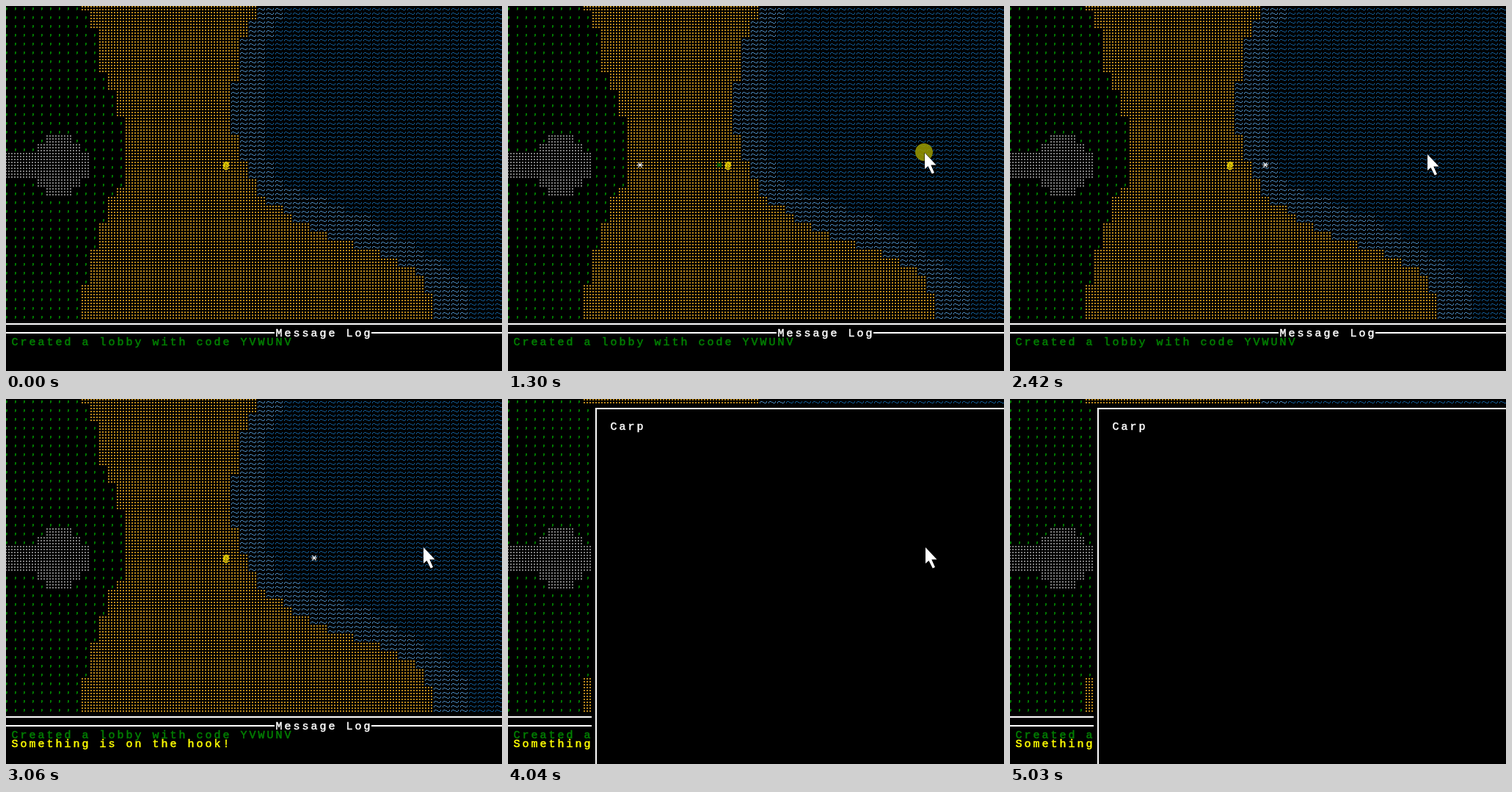
Animation of 676 by 497 pixels, one loop 6070 ms. Source, as an HTML page with a canvas:

```html
<!DOCTYPE html>
<html lang="en">
<head>
<meta charset="utf-8">
<title>Fishing</title>
<style>
html, body { margin: 0; width: 100%; height: 100%; overflow: hidden; background: #000; }
canvas, svg { position: absolute; left: 0; top: 0; display: block; }
text {
  font: 15px "Liberation Mono", "DejaVu Sans Mono", monospace;
  letter-spacing: 3px;
  white-space: pre;
  fill: #fff;
  stroke: #fff;
  stroke-width: .5px;
}
.green { fill: #008000; stroke: #008000; }
.yellow { fill: #ff0; stroke: #ff0; }
.star { fill: none; stroke: #fff; stroke-width: 1.1; }
#hero { font-size: 13px; letter-spacing: 0; text-anchor: middle; fill: #ffe800; stroke: #ffe800; }

.anim { animation: 6070ms step-end infinite; }
#mark { animation-name: mark; }
#meter { animation-name: meter; stroke: #008000; }
#bobber { animation-name: bobber; }
#bite { animation-name: bite; }
#panel { animation-name: panel; }
#click { animation-name: click; }
#cursor { animation-name: cursor; }
#passing { animation-name: passing; }

@keyframes mark {
  0%, 35.25%, 66.55%, 100% { opacity: 0; }
  20.26%, 65.4% { opacity: 1; }
}
@keyframes meter {
  0%, 35.25%, 100% { transform: translate(-99px, 216.5px); }
  21.41% { transform: translate(288px, 216.5px); }
  24.87% { transform: translate(276px, 216.5px); }
  27.18% { transform: translate(264px, 216.5px); }
  30.64% { transform: translate(252px, 216.5px); }
  32.94% { transform: translate(240px, 216.5px); }
}
@keyframes bobber {
  0%, 66.55%, 100% { transform: translate(-99px, 216.5px); }
  36.4% { transform: translate(312px, 216.5px); }
  37.56% { transform: translate(324px, 216.5px); }
  38.71% { transform: translate(336px, 216.5px); }
  39.86% { transform: translate(348px, 216.5px); }
  41.02% { transform: translate(360px, 216.5px); }
  42.17% { transform: translate(372px, 216.5px); }
  43.32% { transform: translate(384px, 216.5px); }
  44.48% { transform: translate(396px, 216.5px); }
  45.63% { transform: translate(420px, 216.5px); }
}
@keyframes bite {
  0%, 100% { opacity: 0; }
  50.41% { opacity: 1; }
}
@keyframes panel {
  0%, 100% { opacity: 0; }
  66.55% { opacity: 1; }
}
@keyframes click {
  0%, 35.25%, 65.4%, 100% { transform: translate(-99px, -99px); }
  19.11% { transform: translate(567px, 188px); }
  20.26% { transform: translate(567px, 194px); }
  21.41% { transform: translate(567px, 199px); }
  22.56%, 64.25% { transform: translate(568px, 200px); }
}
@keyframes cursor {
  0%, 82.86%, 100% { transform: translate(-99px, -99px); }
  10.87% { transform: translate(653px, 286px); }
  12.02% { transform: translate(604px, 249px); }
  13.17% { transform: translate(569px, 219px); }
  14.49% { transform: translate(545px, 181px); }
  15.65% { transform: translate(569px, 202px); }
  19.11% { transform: translate(568px, 190px); }
  20.26% { transform: translate(568px, 196px); }
  21.41% { transform: translate(568px, 200px); }
  22.56% { transform: translate(569px, 202px); }
  79.4% { transform: translate(581px, 240px); }
  80.56% { transform: translate(607px, 325px); }
  81.71% { transform: translate(642px, 444px); }
}
@keyframes passing {
  0%, 7.57%, 100% { opacity: 0; }
  6.42% { opacity: 1; }
}
</style>
</head>
<body>
<canvas id="map" width="676" height="497"></canvas>
<svg width="676" height="497" viewBox="0 0 676 497">
  <defs>
    <path id="asterisk" d="M-4 0H4M-2.6 -3.3L2.6 3.3M2.6 -3.3L-2.6 3.3"/>
    <path id="arrow" d="M0 0V22L4.5 18L9.8 28.5L13 27L8.3 16.5H15.5Z" fill="#fff" stroke="#000" paint-order="stroke"/>
  </defs>

  <path d="M0 432H676V434H0ZM0 444H366V446H0ZM498 444H676V446H498Z" fill="#fff"/>
  <text x="367.5" y="450">Message Log</text>
  <text class="green" x="7.5" y="462">Created a lobby with code YVWUNV</text>
  <text class="yellow anim" id="bite" x="7.5" y="474">Something is on the hook!</text>

  <text id="hero" x="300" y="220.5">@</text>
  <g id="mark" class="anim"><use href="#asterisk" class="star" x="180" y="216.5"/></g>
  <use href="#asterisk" id="meter" class="star anim"/>
  <use href="#asterisk" id="bobber" class="star anim"/>

  <g id="panel" class="anim">
    <rect x="114" y="7" width="562" height="490"/>
    <path d="M119 497V12H676V14H121V497Z" fill="#fff"/>
    <text x="139.5" y="42">Carp</text>
  </g>

  <circle id="click" class="anim" r="12" fill="#9a9a00" fill-opacity=".86"/>
  <use href="#arrow" id="cursor" class="anim"/>
  <g id="passing" class="anim">
    <use href="#arrow" x="298" y="214"/>
    <use href="#arrow" x="373" y="262"/>
  </g>
</svg>
<script>
const CELL = 12, COLS = 57, ROWS = 36;
const ctx = document.getElementById('map').getContext('2d');

// [value, rows] pairs become one value per map row
const expand = runs => runs.flatMap(([v, n = 1]) => Array(n).fill(v));

const grassEnd = expand([[9], [10, 2], [11, 5], [12, 2], [13, 3], [14, 8], [13], [12, 3], [11, 3], [10, 4], [9, 4]]);
const shore = expand([[29, 2], [28, 2], [27, 5], [26, 6], [27, 3], [28, 2], [29, 2],
  [30], [32], [33], [35], [37], [40], [43], [45], [47], [48, 2], [49, 3]]);
const shallowEnd = expand([[32, 2], [31, 2], [30, 14], [31, 2], [32], [34],
  [37], [39], [42], [43], [45], [47], [48], [50], [51], [52], [53, 4]]);

function isStone(col, row) {
  const d = Math.abs(row - 18);
  if (d < 2) return col < 10;
  if (d === 2) return col > 3 && col < 9;
  return d === 3 && col > 4 && col < 8;
}

function dots(x, y, color) {
  ctx.fillStyle = color;
  for (let i = 1; i < CELL; i += 4) {
    for (let j = 2; j < CELL; j += 4) ctx.fillRect(x + i, y + j, 2, 2);
  }
}

function comma(x, y) {
  ctx.fillStyle = '#007600';
  ctx.fillRect(x + 6, y + 8, 2, 3);
  ctx.fillRect(x + 6, y + 11, 1, 1);
}

function waves(x, y, color) {
  ctx.fillStyle = color;
  for (const mid of [y + 4, y + 10]) {
    ctx.fillRect(x + 1, mid, 1, 2);
    ctx.fillRect(x + 2, mid - 1, 3, 1);
    ctx.fillRect(x + 5, mid, 2, 1);
    ctx.fillRect(x + 7, mid + 1, 3, 1);
    ctx.fillRect(x + 10, mid - 1, 1, 2);
  }
}

ctx.fillRect(0, 0, 676, 497);
for (let row = 0; row < ROWS; row++) {
  for (let col = 0; col < COLS; col++) {
    const x = col * CELL - 6, y = row * CELL - 6;
    if (isStone(col, row)) dots(x, y, '#7c7c7c');
    else if (col < grassEnd[row]) comma(x, y);
    else if (col < shore[row]) dots(x, y, '#b8861b');
    else waves(x, y, col < shallowEnd[row] ? '#4682b4' : '#11568c');
  }
}
</script>
</body>
</html>
```
